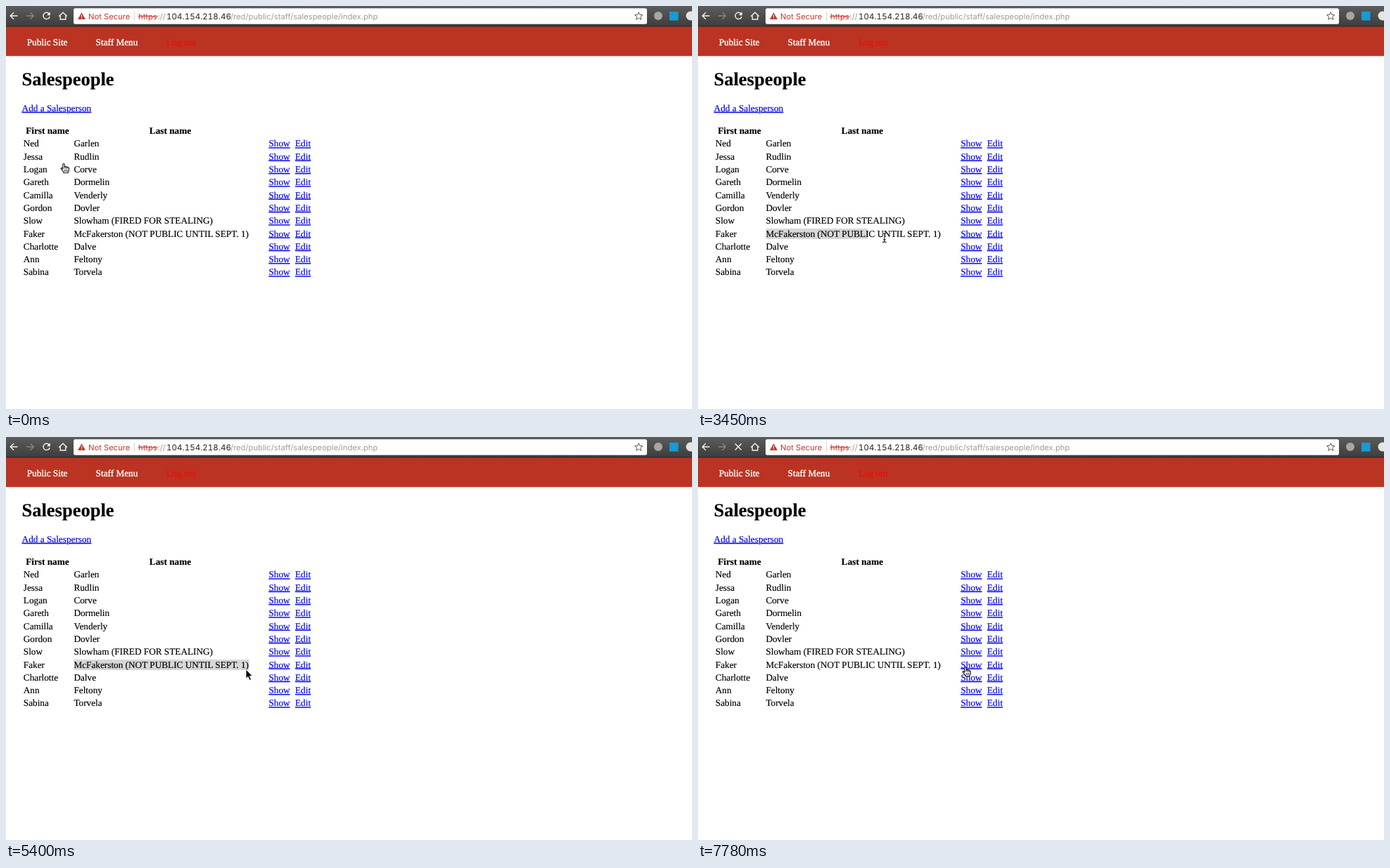
An HTML page for the animation above (8 s loop, 975x574 px).

```html
<!DOCTYPE html>
<html lang="en">
<head>
<meta charset="utf-8">
<title>Salespeople</title>
<style>
html, body { margin: 0; width: 100%; height: 100%; overflow: hidden; background: #fff; }
svg { display: block; width: 100%; height: 100%; }
text { font: 13.25px "Liberation Serif", "Times New Roman", serif; text-rendering: geometricPrecision; white-space: pre; stroke: #000; stroke-width: .15; }
.bold { font-weight: bold; }
.title { font-size: 26.5px; }
.link { fill: #00e; stroke: #00e; text-decoration: underline; }
.nav { fill: #fff; stroke: #fff; stroke-width: .35; }
.logout { fill: red; stroke: none; }
.bar { font: 11.22px Inter, "Liberation Sans", sans-serif; stroke: none; }
.host { font-size: 11.6px; font-variant-numeric: tabular-nums; }
.icon { fill: none; stroke: #f2f2f2; stroke-width: 1.4; }

#cursor { animation: move 8s step-end infinite; }
#arrow { animation: arrow 8s step-end infinite; }
#beam { animation: beam 8s step-end infinite; }
#hand { animation: hand 8s step-end infinite; }
#selection { animation: select 8s step-end infinite; }
#reload { animation: reload 8s step-end infinite; }
#stop { animation: stop 8s step-end infinite; }

@keyframes move {
  0% { transform: translate(84px, 231px); }
  13.125% { transform: translate(88px, 236px); }
  15% { transform: translate(106px, 256px); }
  17.125% { transform: translate(128px, 277px); }
  19% { transform: translate(147px, 293px); }
  20.875% { transform: translate(177px, 318px); }
  22.75% { transform: translate(193px, 331px); }
  28.375% { transform: translate(170px, 330px); }
  30.25% { transform: translate(145px, 329px); }
  32% { transform: translate(127px, 327px); }
  33.875% { transform: translate(118px, 326px); }
  35.75% { transform: translate(106px, 325px); }
  37.625% { transform: translate(101px, 325px); }
  39.5% { transform: translate(150px, 327px); }
  41.375% { transform: translate(225px, 329px); }
  43.125% { transform: translate(265px, 330px); }
  45% { transform: translate(293px, 331px); }
  46.875% { transform: translate(313px, 331px); }
  48.75% { transform: translate(328px, 331px); }
  50.625% { transform: translate(337px, 331px); }
  52.5% { transform: translate(341px, 331px); }
  54.375% { transform: translate(343px, 331px); }
  67.5% { transform: translate(341px, 331px); }
  78.625% { transform: translate(242px, 319px); }
  80.5% { transform: translate(209px, 319px); }
  88% { transform: translate(225px, 322px); }
  89.875% { transform: translate(280px, 331px); }
  91.75% { transform: translate(335px, 335px); }
  93.625% { transform: translate(366px, 335px); }
  95.375%, 100% { transform: translate(382px, 334px); }
}
@keyframes arrow {
  0%, 28.375%, 78.625%, 95.375%, 100% { visibility: hidden; }
  13.125%, 67.5%, 89.875% { visibility: visible; }
}
@keyframes beam {
  0%, 67.5%, 89.875%, 100% { visibility: hidden; }
  28.375%, 78.625% { visibility: visible; }
}
@keyframes hand {
  0%, 95.375%, 100% { visibility: visible; }
  13.125% { visibility: hidden; }
}
@keyframes select {
  0%, 71.25%, 100% { width: 0; }
  39.5% { width: 26px; }
  41.375% { width: 96px; }
  43.125% { width: 145px; }
  45% { width: 176px; }
  46.875% { width: 201px; }
  48.75% { width: 226px; }
  50.625% { width: 239px; }
  52.5% { width: 249px; }
}
@keyframes reload {
  0% { visibility: visible; }
  97.25%, 100% { visibility: hidden; }
}
@keyframes stop {
  0% { visibility: hidden; }
  97.25%, 100% { visibility: visible; }
}
</style>
</head>
<body>
<svg viewBox="0 0 975 574" preserveAspectRatio="none">
  <defs>
    <linearGradient id="chrome" x2="0" y2="1">
      <stop stop-color="#5c5c5c"/>
      <stop offset="1" stop-color="#3c3c3c"/>
    </linearGradient>
    <path id="stem" d="M-2.8 -6.5Q0 -6.5 0 -4.8Q0 -6.5 2.8 -6.5M0 -4.8V4.8M-2.8 6.5Q0 6.5 0 4.8Q0 6.5 2.8 6.5M-1.8 2.8H1.8"/>
  </defs>

  <rect width="975" height="30" fill="url(#chrome)"/>
  <rect y="28.5" width="975" height="1.5" fill="#292929"/>
  <g class="icon">
    <path d="M16.5 14H6.5M11 9.2L6.2 14L11 18.8"/>
    <path d="M29 14H39M34.5 9.2L39.3 14L34.5 18.8" stroke="#858585"/>
    <g id="reload">
      <path d="M61.4 11A4.7 4.7 0 1 0 62.2 15.2"/>
      <path d="M62.8 8.5V13.2H58.1Z" fill="#f2f2f2" stroke="none"/>
    </g>
    <path id="stop" d="M52.7 9.6L61.7 18.6M61.7 9.6L52.7 18.6"/>
    <path d="M75.2 14.8L81 9.2L86.8 14.8M77.2 13.6V19H84.8V13.6"/>
  </g>

  <rect x="96" y="3.3" width="815" height="22.4" rx="2.5" fill="#fff"/>
  <path d="M107.5 9.2L113 19H102Z" fill="#c53929"/>
  <path d="M107.5 12.5V15.6M107.5 16.5V17.7" stroke="#fff" stroke-width="1.1"/>
  <path d="M182.5 8V21" stroke="#d5d5d5"/>
  <g fill="#c53929">
    <text class="bar" x="117" y="18.6">Not Secure</text>
    <text class="bar" x="188" y="18.6">https</text>
    <path d="M187.5 15H216" stroke="#c53929"/>
  </g>
  <text class="bar" x="215.5" y="18.6" fill="#999">://</text>
  <text class="bar host" x="228" y="18.6" fill="#222">104.154.218.46</text>
  <text class="bar" x="319" y="18.6" fill="#9c9c9c">/red/public/staff/salespeople/index.php</text>
  <path d="M899.3 8.7L900.9 12.4L904.9 12.8L901.9 15.4L902.8 19.3L899.3 17.2L895.8 19.3L896.7 15.4L893.7 12.8L897.7 12.4Z" fill="none" stroke="#555"/>
  <circle cx="927" cy="14" r="6" fill="#a6a6a6"/>
  <rect x="943" y="8" width="12.5" height="12.5" fill="#179bd7"/>
  <circle cx="973" cy="14" r="6.5" fill="#e4e4e4"/>

  <rect y="29.5" width="975" height="41.8" fill="#bb3322"/>
  <text class="nav" x="29.7" y="56">Public Site</text>
  <text class="nav" x="127.6" y="56">Staff Menu</text>
  <text class="logout" x="228" y="56">Log out</text>

  <text class="bold title" x="22.5" y="113">Salespeople</text>
  <text class="link" x="22.6" y="149.8">Add a Salesperson</text>
  <text class="bold" x="28.2" y="182.2">First name</text>
  <text class="bold" x="203.8" y="182.2">Last name</text>
  <rect id="selection" x="96.5" y="317" width="0" height="15" fill="#d7d7d7"/>
  <g id="rows"></g>

  <g id="cursor">
    <path id="arrow" d="M0 0V13.2L3 10.4L5.2 15.4L7.5 14.4L5.4 9.6H9.4Z" stroke="#fff" stroke-width=".9"/>
    <g id="beam" fill="none">
      <use href="#stem" stroke="#fff" stroke-opacity=".6" stroke-width="2.2"/>
      <use href="#stem" stroke="#111" stroke-width="1.1"/>
    </g>
    <g id="hand" stroke="#111" stroke-linejoin="round" stroke-linecap="round">
      <path d="M-3.2 1.2V-5.2Q-3.2 -6.5 -2 -6.5T-.8 -5.2V-1.8Q.1 -3 1.3 -1.8Q2.4 -2.6 3.3 -1.3Q5.4 -1.8 5.4 .6V3Q5.4 4.2 4.2 5.4V6.8H-2V5.4L-5.8 .8Q-6 -.6 -4.6 -.4Z" fill="#fff" stroke-width="1.1"/>
      <path d="M-.8 -1.8V.4M1.3 -1.6V.6M3.3 -1.2V.8M-.6 2.4V4.6M1.2 2.4V4.6M3 2.4V4.6" fill="none" stroke-width=".8"/>
    </g>
  </g>
</svg>
<script>
const people = [
  ["Ned", "Garlen"], ["Jessa", "Rudlin"], ["Logan", "Corve"], ["Gareth", "Dormelin"],
  ["Camilla", "Venderly"], ["Gordon", "Dovler"], ["Slow", "Slowham (FIRED FOR STEALING)"],
  ["Faker", "McFakerston (NOT PUBLIC UNTIL SEPT. 1)"], ["Charlotte", "Dalve"],
  ["Ann", "Feltony"], ["Sabina", "Torvela"]
];
const cell = (x, y, label, kind = "") => `<text class="${kind}" x="${x}" y="${y}">${label}</text>`;
document.getElementById("rows").innerHTML = people.map(([first, last], i) => {
  const y = 200.4 + i * 18.3;
  return cell(24.8, y, first) + cell(96.4, y, last) +
    cell(373.4, y, "Show", "link") + cell(411, y, "Edit", "link");
}).join("");
</script>
</body>
</html>
```
